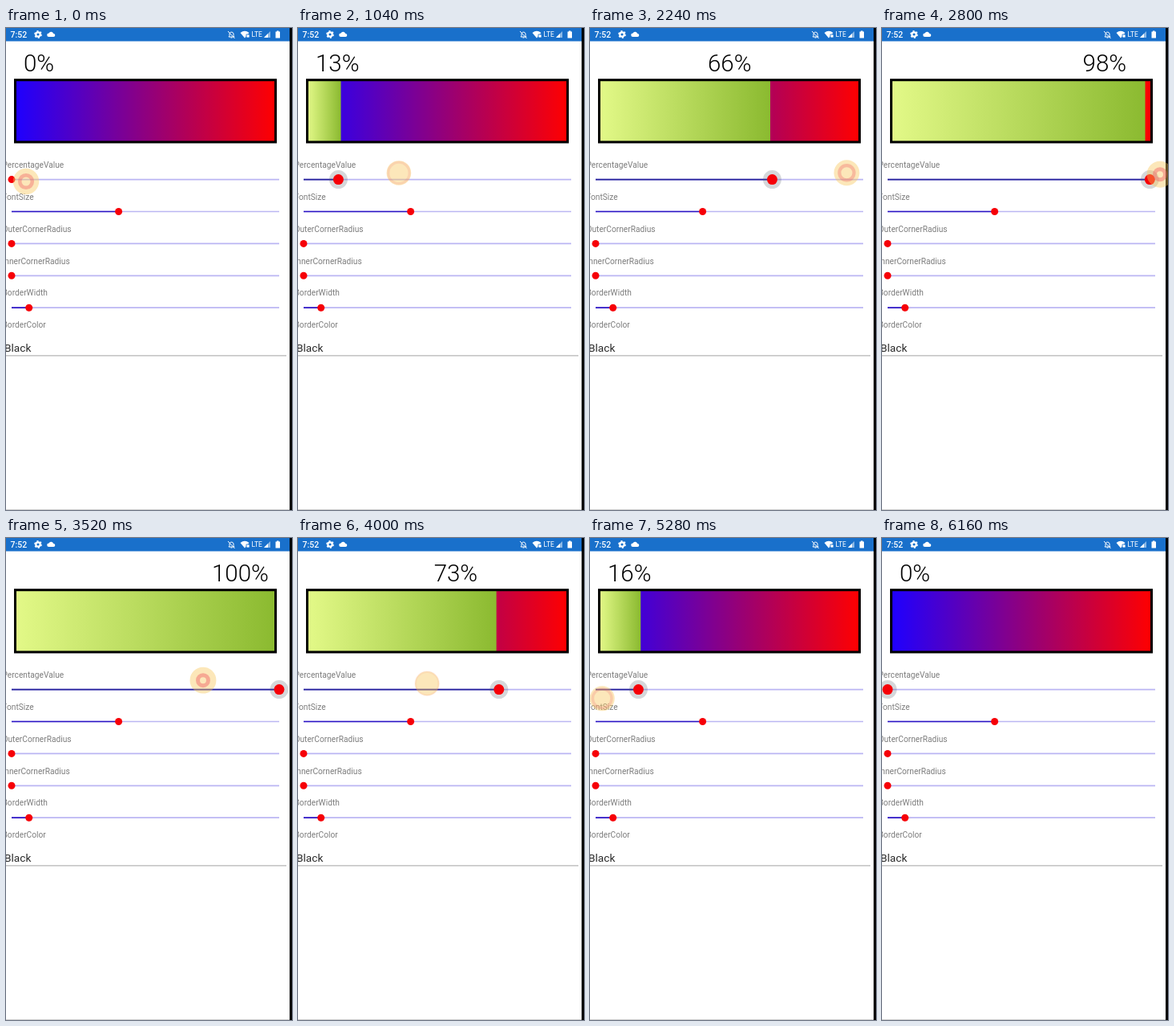
An HTML page that plays this animation: 357x600 px, repeating every 6240 ms.

```html
<!DOCTYPE html>
<html lang="en">
<head>
<meta charset="utf-8">
<title>Percentage bar</title>
<style>
  html, body { margin: 0; width: 100%; height: 100%; overflow: hidden; background: #fff; }
  svg { display: block; width: 100vw; height: 100vh; font-family: Roboto, "Open Sans", sans-serif; }
  .label { font-size: 10.2px; fill: #7d7d7d; }
  .rest { stroke: #bbb6f3; stroke-width: 1.7; }
  .done { stroke: #2a12c4; stroke-width: 1.7; }
  .thumb { fill: #f60008; }
  .frame { fill: none; stroke: #000; stroke-width: 3; }
  .line { fill: none; stroke: #fff; }
</style>
</head>
<body>
<svg viewBox="0 0 357 600">
  <defs>
    <linearGradient id="base">
      <stop offset="0" stop-color="#1e00ff"/>
      <stop offset="1" stop-color="#ff0000"/>
    </linearGradient>
    <linearGradient id="green">
      <stop offset="0" stop-color="#e3f988"/>
      <stop offset="1" stop-color="#8bba30"/>
    </linearGradient>
  </defs>
  <rect width="357" height="600" fill="#fff"/>

  <g fill="#fff">
    <rect width="354" height="16.5" fill="#1970cb"/>
    <text x="5.5" y="11.8" font-size="10.5" font-weight="500">7:52</text>
    <circle class="line" cx="40" cy="8" r="2.7" stroke-width="2.2"/>
    <circle class="line" cx="40" cy="8" r="4.2" stroke-width="1.4" stroke-dasharray="2.2"/>
    <path d="M53.5 11a2.3 2.3 0 0 1 0-4.6 3.2 3.2 0 0 1 5.8.6 2 2 0 0 1 0 4z"/>
    <path class="line" d="M278 11h7l-1-1.5V7a2.6 2.6 0 0 0-5 0v2.5zM280.5 12h2M277 4l8.5 9"/>
    <path d="M292.5 6q5.5-4.500 11 0l-5.500 6.500z"/>
    <path d="M300 8h4v4h-4z" stroke="#1970cb" stroke-width=".8"/>
    <text x="306.5" y="11.3" font-size="8.5">LTE</text>
    <path d="M322 12l8-8v8z" fill-opacity=".5"/>
    <path d="M322 12l5-5v5z"/>
    <path d="M336.5 4.5h1.500v-1h2.500v1h1.500v8h-5.500z"/>
  </g>

  <text id="percent" y="54" font-size="29.5" font-weight="300"></text>
  <rect x="11.5" y="64.7" width="325" height="77.3" fill="url(#base)"/>
  <rect id="fill" x="11.5" y="66" height="75" fill="url(#green)"/>
  <rect class="frame" x="11.5" y="64.7" width="325" height="77.3"/>

  <g id="sliders"></g>

  <text class="label" x="-4.5" y="373.3">BorderColor</text>
  <text x="-2" y="402.5" font-size="13.7" fill="#2a2a2a">Black</text>
  <path d="M0 407.8H350" stroke="#b4b4b4" stroke-width="1.3"/>
  <path d="M0 599.5H354" stroke="#d0d0d0"/>
  <rect x="354" width="3" height="600"/>

  <g id="touch">
    <circle id="glow" fill="#f7c65a" fill-opacity=".42"/>
    <circle id="ring" fill="none" stroke="#ee5a62"/>
  </g>
</svg>
<script>
const LOOP = 6240, STEP = 80;
const LEFT = 7, TRACK = 334;
// The thumb follows the finger out and back, each time with a delay
const PRESS = 422, RISE = 2410;
const OUT = 2750, TURN = 2995, BACK = 2775, LAG = 525;
const LIFT = 5700, PULSE = 720;

const $ = id => document.getElementById(id);
const clamp = u => Math.min(1, Math.max(0, u));
const easeInOut = u => (1 - Math.cos(Math.PI * clamp(u))) / 2;
const easeOut = u => Math.sin(Math.PI / 2 * clamp(u));

function set(el, attrs) {
  for (const name in attrs) el.setAttribute(name, attrs[name]);
  return el;
}

function add(parent, tag, attrs) {
  return parent.appendChild(set(document.createElementNS("http://www.w3.org/2000/svg", tag), attrs));
}

function makeSlider(name, value, row) {
  const y = 188.6 + row * 39.9, x = LEFT + TRACK * value / 100;
  const g = $("sliders");
  add(g, "text", { class: "label", x: -4.5, y: y - 14.8 }).textContent = name;
  add(g, "path", { class: "rest", d: `M${LEFT} ${y}H${LEFT + TRACK}` });
  return {
    y,
    done: add(g, "path", { class: "done", d: `M${LEFT} ${y}H${x}` }),
    halo: add(g, "circle", { cx: x, cy: y, r: 0, fill: "#56606a", "fill-opacity": .25 }),
    thumb: add(g, "circle", { class: "thumb", cx: x, cy: y, r: 4.5 })
  };
}

const main = makeSlider("PercentageValue", 0, 0);
makeSlider("FontSize", 40, 1);
makeSlider("OuterCornerRadius", 0, 2);
makeSlider("InnerCornerRadius", 0, 3);
makeSlider("BorderWidth", 6.5, 4);
main.done.style.stroke = "#25209c";

function percentAt(t) {
  const rise = clamp((t - PRESS) / RISE) ** 1.5;
  const fall = easeOut((t - TURN - LAG) / BACK);
  return Math.round(100 * (rise - fall));
}

// The finger swings along a shallow arc, lower on the way back
function touchAt(t) {
  const x = 25 + 322 * easeInOut(t / OUT) - 345 * easeOut((t - TURN) / BACK);
  const top = t < TURN ? 225 : 270;
  return { cx: x, cy: 177 + .00035 * (x - top) ** 2 };
}

function drawSlider(value, pressed) {
  const x = LEFT + TRACK * value / 100;
  set(main.done, { d: `M${LEFT} ${main.y}H${x}` });
  set(main.halo, { cx: x, r: pressed ? 11.5 : 0 });
  set(main.thumb, { cx: x, r: pressed ? 6.5 : 4.5 });
}

function drawBar(value) {
  const width = 3.235 * value;
  set($("fill"), { width });
  set($("percent"), { x: Math.max(22, width - 66.5) }).textContent = value + "%";
}

function drawTouch(t) {
  const spot = touchAt(t);
  const pulse = (t / PULSE + .4) % 1;
  set($("touch"), { visibility: t < LIFT ? "visible" : "hidden" });
  set($("glow"), { ...spot, r: 17 - 2 * pulse });
  set($("ring"), {
    ...spot,
    r: 3 + 12 * pulse,
    "stroke-width": 6 - 3.5 * pulse,
    "stroke-opacity": .6 - .55 * pulse
  });
}

const start = performance.now();
function tick() {
  const now = (performance.now() - start) % LOOP;
  const t = Math.floor(now / STEP) * STEP;
  const value = percentAt(t);
  drawSlider(value, t >= PRESS);
  drawBar(value);
  drawTouch(t);
  requestAnimationFrame(tick);
}
tick();
</script>
</body>
</html>
```
